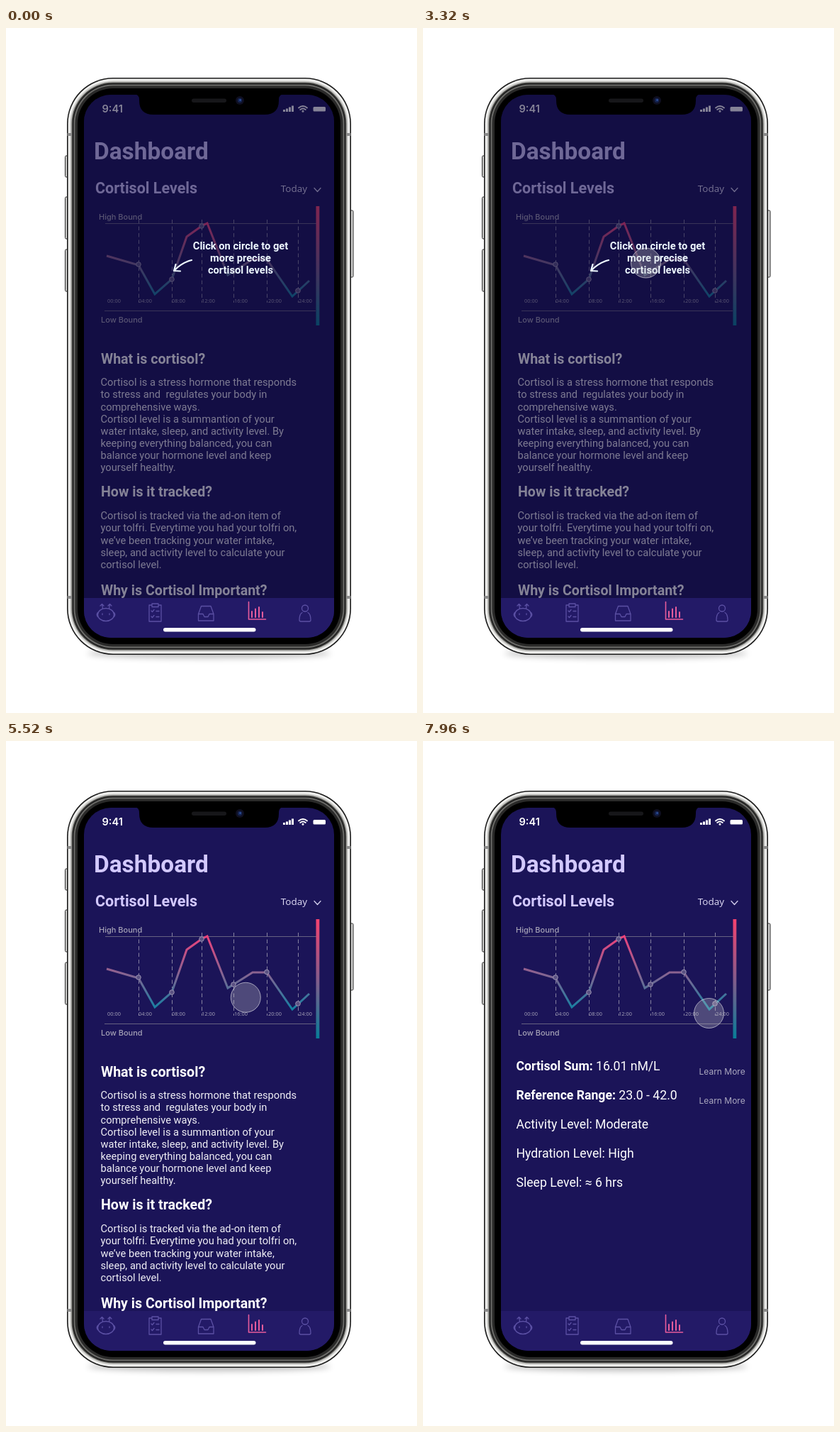
Animation of 580x965 px, one loop 8000 ms. Source, as an HTML page:

```html
<!DOCTYPE html>
<html lang="en">
<head>
<meta charset="utf-8">
<title>Dashboard</title>
<style>
  html, body { margin: 0; width: 100%; height: 100%; overflow: hidden; background: #fff; }
  svg { display: block; width: 580px; height: 965px; }
  text { font-family: Roboto, sans-serif; white-space: pre; fill: #fff; }
  .bold { font-weight: 700; }
  .title { font-weight: 700; fill: #d3c9ff; }
  .head { font-size: 19.6px; font-weight: 700; }
  .body { font-size: 14.65px; fill: #efeef5; }
  .row { font-size: 17.65px; }
  .bound { font: 500 11px Inter, sans-serif; fill: #a5a2b6; }
  .more { font: 400 12px Inter, sans-serif; fill: #aba8bf; }
  .hour { font: 400 7.4px "Noto Sans", sans-serif; fill: #a09db4; }
  .hint { font-size: 14.65px; font-weight: 700; text-anchor: middle; fill: #edf7ff; }
  .line { fill: none; stroke-linecap: round; stroke-linejoin: round; }
</style>
</head>
<body>
<svg viewBox="0 0 580 965">
  <defs>
    <linearGradient id="curve" gradientUnits="userSpaceOnUse" x1="0" y1="275" x2="0" y2="378">
      <stop offset="0" stop-color="#ee427b"/><stop offset=".5" stop-color="#8a6390"/>
      <stop offset="1" stop-color="#1480a2"/>
    </linearGradient>
    <linearGradient id="scale" x2="0" y2="1">
      <stop offset="0" stop-color="#f5426f"/><stop offset=".5" stop-color="#855c8a"/>
      <stop offset="1" stop-color="#087d98"/>
    </linearGradient>
    <filter id="soft" x="-20%" y="-200%" width="140%" height="500%"><feGaussianBlur stdDeviation="4"/></filter>
    <clipPath id="screen"><rect x="110" y="94" width="353" height="765" rx="38"/></clipPath>
    <clipPath id="page"><rect x="110" y="94" width="353" height="709"/></clipPath>
  </defs>

  <ellipse cx="286.500" cy="881" rx="172" ry="7" fill="#000" opacity=".25" filter="url(#soft)"/>
  <g id="case"></g>

  <g clip-path="url(#screen)">
    <rect x="110" y="94" width="353" height="765" fill="#1b1458"/>
    <g clip-path="url(#page)">
      <text x="135.500" y="119" style="font:600 14.600px Inter,sans-serif">9:41</text>
      <path d="M392.500 118v-3M396.500 118v-4.500M400.500 118v-6.500M404.500 118v-8.500" stroke="#fff" stroke-width="3"/>
      <g class="line" stroke="#fff" stroke-width="1.900">
        <path d="M413 112.500q6-5 12 0M415.200 115q3.800-3 7.600 0"/>
        <circle cx="419" cy="117.300" r=".6"/>
      </g>
      <rect x="433.500" y="111" width="17.500" height="6.500" rx="1.500" fill="#fff"/>

      <text class="title" x="124" y="185" font-size="33.400">Dashboard</text>
      <text class="title" x="126" y="232.500" font-size="21.500">Cortisol Levels</text>
      <text x="387.800" y="230.700" style="font:400 13.500px 'Open Sans',sans-serif;fill:#e0dcf5">Today</text>
      <path class="line" d="M435 225.500l4.500 5 4.500-5" stroke="#d0cbea" stroke-width="1.300"/>

      <text class="bound" x="131" y="270">High Bound</text>
      <text class="bound" x="134" y="415">Low Bound</text>
      <path d="M140 275.500H440M139 398.500H437" stroke="#666181"/>
      <g id="chart"></g>
      <rect x="437.500" y="251" width="4.800" height="168" fill="url(#scale)"/>

      <g id="about"></g>
      <g id="details"></g>

      <g id="hint">
        <rect x="110" y="94" width="353" height="709" fill="#0d0830" opacity=".5"/>
        <text class="hint" x="331" y="312">Click on circle to get</text>
        <text class="hint" x="331" y="329">more precise</text>
        <text class="hint" x="331" y="346">cortisol levels</text>
        <path class="line" d="M262 327q-13 3-24 14M239.500 333l-2.500 9 9 .5" stroke="#edf7ff" stroke-width="2.200"/>
      </g>
    </g>

    <rect x="110" y="803" width="353" height="56" fill="#231a67"/>
    <g class="line" stroke="#5b50a4" stroke-width="1.300">
      <ellipse cx="141" cy="826.500" rx="11.500" ry="9"/>
      <path d="M129.500 823.500q-2.500 3 0 6M152.500 823.500q2.500 3 0 6M136.500 818l-1-6M145.500 818l1-6M133 814l2.500-2.500 2.500 2.500M144 814l2.500-2.500 2.500 2.500M136 825v1.500M146 825v1.500"/>
      <path d="M206 813h-4v23h17v-23h-4M206 811h9v4.500h-9zM205 821l1.500 1.500 2.500-3M205 829l1.500 1.500 2.500-3M212 821.500h4M212 829.500h4"/>
      <path d="M275.500 814.500h13.500l4 11v9.500h-21.500v-9.500zM271.500 825.500h6.500l2 4h5l2-4h6"/>
      <circle cx="422" cy="817.500" r="4.500"/>
      <path d="M418 823.500q-4 2-4 10.500q0 2 2 2h12q2 0 2-2q0-8.500-4-10.500"/>
    </g>
    <path class="line" d="M342.500 808.500v24.500h24" stroke="#e65c9c" stroke-width="1.600"/>
    <path class="line" d="M347 830v-8M352 830v-11.500M357 830v-14M362 830v-7" stroke="#e65c9c" stroke-width="2"/>
    <rect x="222" y="845" width="130.500" height="5.500" rx="2.750" fill="#fff"/>
  </g>

  <path d="M180 93q8 0 8 8v1q0 20 20 20h157q20 0 20-20v-1q0-8 8-8z" fill="#000"/>
  <rect x="262" y="99.500" width="49" height="5.500" rx="2.750" fill="#17171a"/>
  <circle cx="330" cy="102" r="6" fill="#0f0f20"/>
  <circle cx="330" cy="102" r="3.200" fill="#142350"/>
  <circle cx="330.500" cy="101.500" r="1.200" fill="#3459a8"/>

  <circle id="touch" r="21" fill="#ccc" fill-opacity=".29" stroke="#fff" stroke-opacity=".55"/>
</svg>

<script>
const $ = id => document.getElementById(id);
const text = (cls, x, y, content) => `<text class="${cls}" x="${x}" y="${y}">${content}</text>`;

// Phone body: side buttons, then nested rounded shells
const button = (x, y, h) => `<rect x="${x}" y="${y}" width="5" height="${h}" rx="1.5" fill="#d2d2d0" stroke="#2a2a2a"/>`;
const shell = ([inset, fill]) => `<rect x="${86 + inset}" y="${70 + inset}" width="${401 - 2 * inset}"
  height="${813 - 2 * inset}" rx="${65 - inset}" fill="${fill}"/>`;
const band = (x, y) => `<rect x="${x}" y="${y}" width="6" height="4" fill="#8b8b8b"/>`;
$('case').innerHTML =
  button(83.5, 180, 30) + button(83.5, 238, 59) + button(83.5, 312, 59) + button(485, 257, 94) +
  [[0, '#1a1a1a'], [1.6, '#f0f0ee'], [4.5, '#c6c6c3'], [6.5, '#50504d'], [8, '#1a1a1a'],
   [9.5, '#6b6b68'], [11.5, '#2a2a29'], [15, '#000']].map(shell).join('') +
  [148, 800].map(y => band(86.5, y) + band(480.5, y)).join('');

const level = [[142, 321], [187, 334], [210, 375], [234, 354], [255, 294], [276, 279], [284, 275],
  [313, 348], [321, 343], [348, 326], [368, 326], [404, 378], [428, 356]];
const markers = [[187, 333], [234, 354], [276, 279], [321, 343], [368, 325.5], [412, 370]];
const hourX = [143, 187, 234, 276, 322, 370, 413];
$('chart').innerHTML =
  markers.map(([x]) => `<path d="M${x + .5} 270V387" stroke="#8682a0" stroke-dasharray="5.5 4"/>`).join('') +
  `<polyline points="${level.join(' ')}" fill="none" stroke="url(#curve)" stroke-width="3"/>` +
  markers.map(([x, y]) => `<circle cx="${x}" cy="${y}" r="3.3" fill="#5b5283" stroke="#a39bb8" stroke-width=".9"/>`).join('') +
  hourX.map((x, i) => text('hour', x, 386.5, String(i * 4).padStart(2, '0') + ':00')).join('');

const paragraph = (y, lines) => lines.map((line, i) => text('body', 133.5, y + i * 17.14, line)).join('');
$('about').innerHTML =
  text('head', 134, 473, 'What is cortisol?') +
  paragraph(504.3, [
    'Cortisol is a stress hormone that responds',
    'to stress and  regulates your body in',
    'comprehensive ways.',
    'Cortisol level is a summantion of your',
    'water intake, sleep, and activity level. By',
    'keeping everything balanced, you can',
    'balance your hormone level and keep',
    'yourself healthy.']) +
  text('head', 134, 660, 'How is it tracked?') +
  paragraph(692.3, [
    'Cortisol is tracked via the ad-on item of',
    'your tolfri. Everytime you had your tolfri on,',
    'we’ve been tracking your water intake,',
    'sleep, and activity level to calculate your',
    'cortisol level.']) +
  text('head', 134, 799, 'Why is Cortisol Important?');

$('details').innerHTML = [
  '<tspan class="bold">Cortisol Sum:</tspan> 16.01 nM/L',
  '<tspan class="bold">Reference Range:</tspan> 23.0 - 42.0',
  'Activity Level: Moderate',
  'Hydration Level: High',
  'Sleep Level: ≈ 6 hrs'
].map((row, i) => text('row', 131.5, 463.7 + i * 41, row)).join('') +
  text('more', 389.5, 470, 'Learn More') + text('more', 389.5, 511, 'Learn More');

// Touch path: [time, x, y]; a repeated position is a rest
const path = [[680, 603, 50], [1000, 405, 205], [1320, 276, 337], [1520, 288, 346], [1920, 305, 349],
  [2160, 314, 313], [2360, 323, 329], [2600, 314.5, 331], [3400, 314.5, 331], [3920, 321.5, 331],
  [4880, 321.5, 331], [5720, 350, 372], [6120, 403.5, 383.5]];

function slope(i, axis) {
  const a = path[i - 1], b = path[i], c = path[i + 1];
  if (!a || !c || a[1] === b[1] || b[1] === c[1]) return 0;
  return (c[axis] - a[axis]) / (c[0] - a[0]);
}

function touchAt(time) {
  const t = Math.min(Math.max(time, path[0][0]), path.at(-1)[0]);
  const i = Math.max(1, path.findIndex(p => p[0] >= t));
  const a = path[i - 1], b = path[i], span = b[0] - a[0], u = (t - a[0]) / span;
  return [1, 2].map(axis =>
    a[axis] * (1 + 2 * u) * (1 - u) ** 2 + b[axis] * u * u * (3 - 2 * u) +
    span * (slope(i - 1, axis) * u * (1 - u) ** 2 - slope(i, axis) * u * u * (1 - u)));
}

const easeOut = (t, from, to) => 1 - (1 - Math.min(1, Math.max(0, (t - from) / (to - from)))) ** 2;

function render(t) {
  const swap = easeOut(t, 7640, 7960);
  $('hint').setAttribute('opacity', 1 - easeOut(t, 3400, 3920));
  $('about').setAttribute('opacity', 1 - swap);
  $('details').setAttribute('opacity', swap);
  $('details').setAttribute('transform', `translate(0 ${33 * (1 - swap)})`);
  $('touch').setAttribute('transform', `translate(${touchAt(t)})`);
}

const start = performance.now();
function tick() {
  render((performance.now() - start) % 8000);
  requestAnimationFrame(tick);
}
tick();
</script>
</body>
</html>
```
